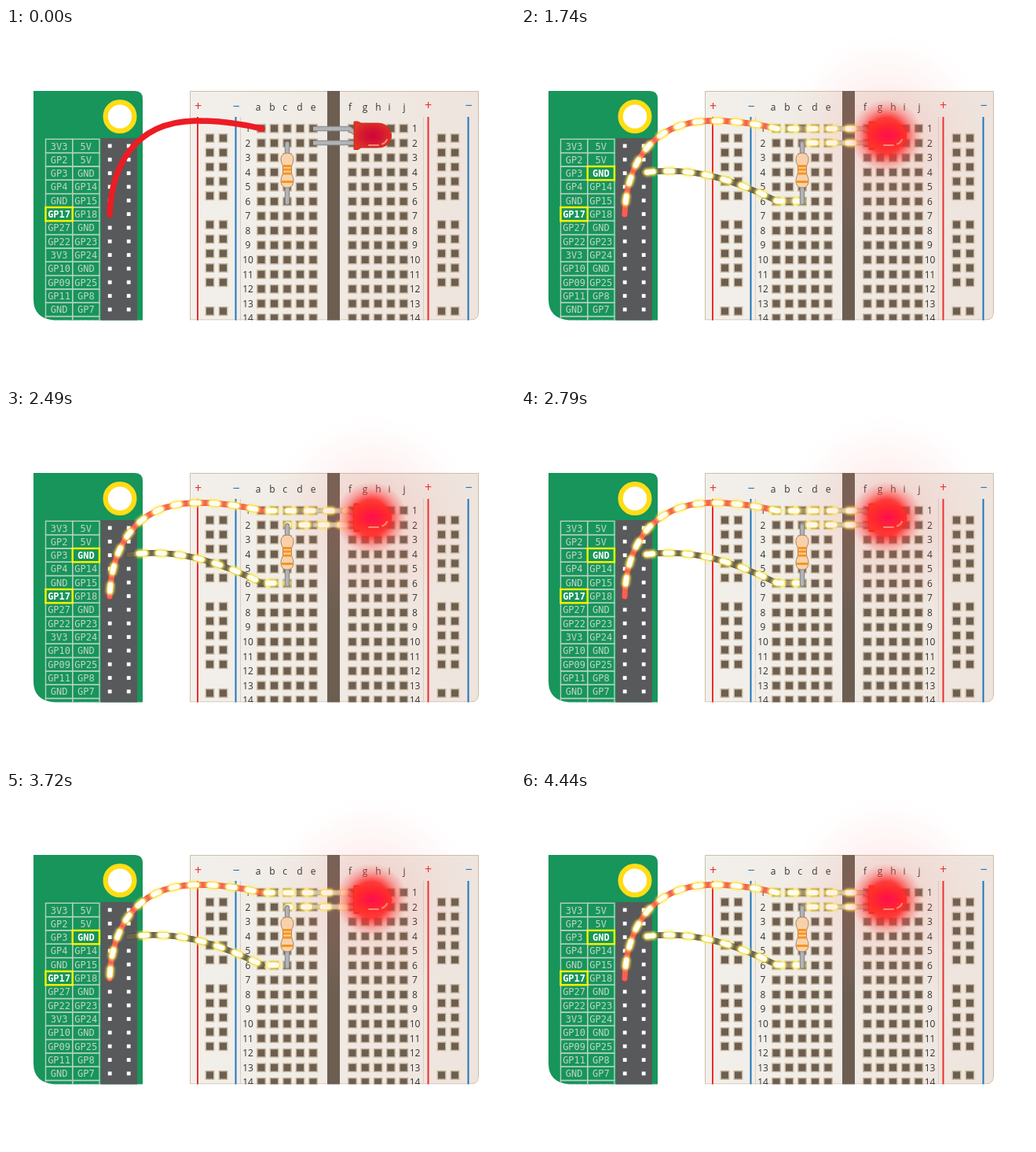
Animation of 648x450 px, one loop 4470 ms. Source, as an HTML page:

```html
<!DOCTYPE html>
<html lang="en">
<head>
<meta charset="utf-8">
<title>LED circuit</title>
<style>
  html, body { margin: 0; width: 100%; height: 100%; overflow: hidden; background: #fff; }
  svg { display: block; width: 648px; height: 450px; }
  .pin-name { font: 12px "DejaVu Sans Mono", monospace; fill: #c3d3c9; text-anchor: middle; }
  .active { font-weight: bold; fill: #fff; }
  .label { font: 12px "Open Sans", "Noto Sans", sans-serif; fill: #333; text-anchor: middle; }
  .sign { font: 16px "Open Sans", "Noto Sans", sans-serif; text-anchor: middle; }
  .wire { fill: none; stroke-width: 7.5; stroke-linecap: round; }
  .flow path { fill: none; stroke-linecap: round; }
</style>
</head>
<body>
<svg viewBox="0 0 648 450">
  <defs>
    <clipPath id="piClip"><path d="M35 80H164Q174 80 174 90V371.5H61Q35 369 35 345Z"/></clipPath>
    <clipPath id="boardClip"><path d="M234 80H602V362Q602 371.5 592 371.5H234Z"/></clipPath>
    <linearGradient id="boardFill">
      <stop stop-color="#f2f0eb"/><stop offset="1" stop-color="#eee4dd"/>
    </linearGradient>
    <radialGradient id="ledOff" cx=".5" cy=".5" r=".55">
      <stop stop-color="#cf0438"/><stop offset=".4" stop-color="#d31432"/><stop offset="1" stop-color="#df3523"/>
    </radialGradient>
    <radialGradient id="ledOn" cx=".5" cy=".5" r=".55">
      <stop stop-color="#ff0f50"/><stop offset=".5" stop-color="#ff1f38"/><stop offset="1" stop-color="#ff3328"/>
    </radialGradient>
    <radialGradient id="halo">
      <stop stop-color="#ff1818"/><stop offset=".5" stop-color="#ff2020" stop-opacity=".85"/>
      <stop offset=".75" stop-color="#ff4040" stop-opacity=".36"/><stop offset="1" stop-color="#ff6060" stop-opacity="0"/>
    </radialGradient>
    <radialGradient id="haze">
      <stop stop-color="#ff5050" stop-opacity=".22"/><stop offset=".5" stop-color="#ff7070" stop-opacity=".09"/>
      <stop offset="1" stop-color="#ff9090" stop-opacity="0"/>
    </radialGradient>
    <filter id="soft" filterUnits="userSpaceOnUse" x="100" y="90" width="370" height="180"><feGaussianBlur stdDeviation="1.7"/></filter>
    <filter id="edge" filterUnits="userSpaceOnUse" x="100" y="90" width="370" height="180"><feGaussianBlur stdDeviation=".6"/></filter>
  </defs>

  <g id="pi" clip-path="url(#piClip)">
    <rect x="35" y="80" width="139" height="292" fill="#17955a"/>
    <circle cx="145" cy="112.5" r="18.3" fill="#fff" stroke="#ffdd15" stroke-width="6.4"/>
    <rect x="121" y="140" width="46" height="232" fill="#58595b"/>
  </g>
  <g id="board" clip-path="url(#boardClip)">
    <path d="M234.5 80.5H601.5V362Q601.5 371 592 371H234.5Z" fill="url(#boardFill)" stroke="#cdbda8"/>
    <rect x="409" y="80" width="16" height="292" fill="#6c5f52"/>
    <path d="M298.5 113V372M531.5 113V372" stroke="#d8cec2"/>
    <path d="M244 113V372M537.5 113V372" stroke="#ee2b2b" stroke-width="2"/>
    <path d="M292.5 113V372M588.5 113V372" stroke="#1c75bc" stroke-width="2"/>
  </g>

  <path d="M391 146H444M391 128H437L444 133" fill="none" stroke="#85878a" stroke-width="6.5"/>
  <path d="M391 146H444M391 128H437L444 133" fill="none" stroke="#b1b3b6" stroke-width="4.5"/>

  <path class="wire" d="M132 237C134 180 160 120 240 118C270 117.5 300 122 326 128" stroke="#ed1c24"/>
  <path id="ground" class="wire" stroke="#231f20"/>
  <g id="flow" class="flow"></g>

  <g id="resistor">
    <path d="M358 147V222" stroke="#85878a" stroke-width="6.4" stroke-linecap="round"/>
    <path d="M358 147V222" stroke="#b1b3b6" stroke-width="4.2" stroke-linecap="round"/>
    <path d="M358 159C364 159 366 163 366 167C366 172 363.500 173 363.500 177V184C363.500 187 366 189 366 194C366 199 364 203 358 203C352 203 350 199 350 194C350 189 352.500 187 352.500 184V177C352.500 173 350 172 350 167C350 163 352 159 358 159Z" fill="#f8d3ac" stroke="#a98259"/>
    <path d="M352.500 175.500H363.500M352.500 180H363.500M352.500 185H363.500M351 195.500H365" stroke="#f7941e" stroke-width="3"/>
  </g>

  <g id="led">
    <path id="ledBody" d="M443 119H448L452 121H473C485 121 490.500 129 490.500 137C490.500 145 485 152 473 152H452L448 154.500H443Z" fill="url(#ledOff)" stroke="#c92a20"/>
    <g id="lit">
      <circle cx="465" cy="137" r="130" fill="url(#haze)"/>
      <circle cx="465" cy="137" r="46" fill="url(#halo)"/>
      <path d="M443 120H473C485 120 490.500 129 490.500 137C490.500 145 485 153 473 153H443Z" fill="url(#ledOn)"/>
    </g>
    <path d="M462 149H474M479 147.500Q483 146 485 142" fill="none" stroke="#f58a79" stroke-width="2" stroke-linecap="round"/>
  </g>
</svg>
<script>
const LOOP = 4470, FRAME = 36;
const WIRE_START = 576, WIRE_STEPS = 12, FLOW_START = 1116;
const DASH = 8, PITCH = 24.4, PITCH_MS = 2700 / 13, DASH_ORIGIN = 1728;
const $ = id => document.getElementById(id);

function add(parent, tag, attrs, text) {
  const node = document.createElementNS('http://www.w3.org/2000/svg', tag);
  for (const key in attrs) node.setAttribute(key, attrs[key]);
  if (text !== undefined) node.textContent = text;
  parent.append(node);
  return node;
}

// Pin header with its name table
const pinNames = ['3V3 5V', 'GP2 5V', 'GP3 GND', 'GP4 GP14', 'GND GP15', 'GP17 GP18', 'GP27 GND',
  'GP22 GP23', '3V3 GP24', 'GP10 GND', 'GP09 GP25', 'GP11 GP8', 'GND GP7', 'GP0 GP1'];
const pi = $('pi');
const rowY = row => 150 + row * 17.33;

function pinCell(parent, row, col, active) {
  const y = rowY(row), x = 50.5 + col * 34.2;
  add(parent, 'rect', { x, y: y - 8.7, width: 34.2, height: 17.33, fill: active ? '#17955a' : 'none',
    stroke: active ? '#fff200' : '#b4d0c0', 'stroke-width': active ? 2.4 : 1.4 });
  add(parent, 'text', { x: x + 17.1, y: y + 4.5, class: active ? 'pin-name active' : 'pin-name' },
    pinNames[row].split(' ')[col]);
}
pinNames.forEach((_, row) => {
  for (const col of [0, 1]) {
    pinCell(pi, row, col, false);
    add(pi, 'rect', { x: 129.8 + col * 24, y: rowY(row) - 2.5, width: 4.8, height: 4.8, fill: '#fff' });
  }
});
pinCell(pi, 5, 0, true);
const groundCell = add(pi, 'g', {});
pinCell(groundCell, 2, 1, true);

// Breadboard holes and labels
const board = $('board');
const hole = (x, y) => add(board, 'rect', { x: x - 5.2, y: y - 5.2, width: 10.4, height: 10.4,
  fill: '#6c5f52', stroke: '#cbb89b', 'stroke-width': 1.4 });

for (let row = 0; row < 14; row++) {
  const y = 127.7 + row * 18.55;
  for (let col = 0; col < 5; col++) {
    hole(325 + col * 16.5, y);
    hole(441 + col * 16.3, y);
  }
  for (const x of [308, 520.5]) add(board, 'text', { x, y: y + 4.3, class: 'label' }, row + 1);
}
for (let i = 0; i < 12; i++) {
  if (i === 5) continue;
  if (i === 11) i = 12;
  for (const x of [259.5, 276.5, 554.5, 571.5]) hole(x, 140 + i * 18.33);
}
const columnX = [321, 339, 355, 374, 391, 438, 457, 474, 488, 507];
columnX.forEach((x, i) => add(board, 'text', { x, y: 105, class: 'label' }, 'abcdefghij'[i]));
for (const [x, y, sign] of [[244.5, 104.5, '+'], [293, 104.5, '−'], [537.5, 103.5, '+'], [589, 103.5, '−']])
  add(board, 'text', { x, y, class: 'sign', fill: sign === '+' ? '#ee2b2b' : '#1c75bc' }, sign);

// Current: start gives the distance to a dash centre, dir the travel along the path
const routes = [
  { d: 'M432 128H326C300 122 270 117.5 240 118C160 120 134 180 132 237', start: 12, dir: -1 },
  { d: 'M432 146H358', start: 12, dir: 1 },
  { d: 'M358 220H326C265 190 215 176 156 184', start: 5, dir: 1 }
];
const layers = [
  { stroke: '#fff6b4', 'stroke-width': 7, opacity: .32 },
  { stroke: '#ffe94a', 'stroke-width': 10, filter: 'url(#soft)', dashed: true },
  { stroke: '#fffef2', 'stroke-width': 6.5, filter: 'url(#edge)', dashed: true }
];
const dashes = [];
for (const { dashed, ...style } of layers) {
  const layer = add($('flow'), 'g', style);
  for (const route of routes) {
    const node = add(layer, 'path', { d: route.d });
    if (!dashed) continue;
    node.setAttribute('stroke-dasharray', `${DASH} ${PITCH - DASH}`);
    dashes.push({ node, route });
  }
}

const clamp = v => Math.max(0, Math.min(1, v));

function groundPath(progress) {
  const u = progress * progress * (3 - 2 * progress);
  const sag = Math.sin(Math.PI * u);
  return `M156 184C${156 + 59 * u} ${184 - 8 * u} ${156 + 109 * u} ${184 + 6 * u + 20 * sag} ` +
    `${156 + 170 * u} ${184 + 36 * u + 64 * sag}`;
}

function draw(time) {
  const t = Math.floor(time / FRAME) * FRAME;
  const wired = t >= WIRE_START;
  groundCell.style.display = $('ground').style.display = wired ? '' : 'none';
  if (wired) $('ground').setAttribute('d', groundPath(clamp(((t - WIRE_START) / FRAME + 1) / WIRE_STEPS)));

  const flowFrame = (t - FLOW_START) / FRAME;
  $('flow').style.opacity = clamp((flowFrame + 1) / 5);
  $('lit').style.opacity = clamp(flowFrame / 8);
  const shift = PITCH * (t - DASH_ORIGIN) / PITCH_MS;
  for (const { node, route } of dashes)
    node.setAttribute('stroke-dashoffset', DASH / 2 - route.start - route.dir * shift);
}

const begin = performance.now();
function tick() {
  draw((performance.now() - begin) % LOOP);
  requestAnimationFrame(tick);
}
tick();
</script>
</body>
</html>
```
